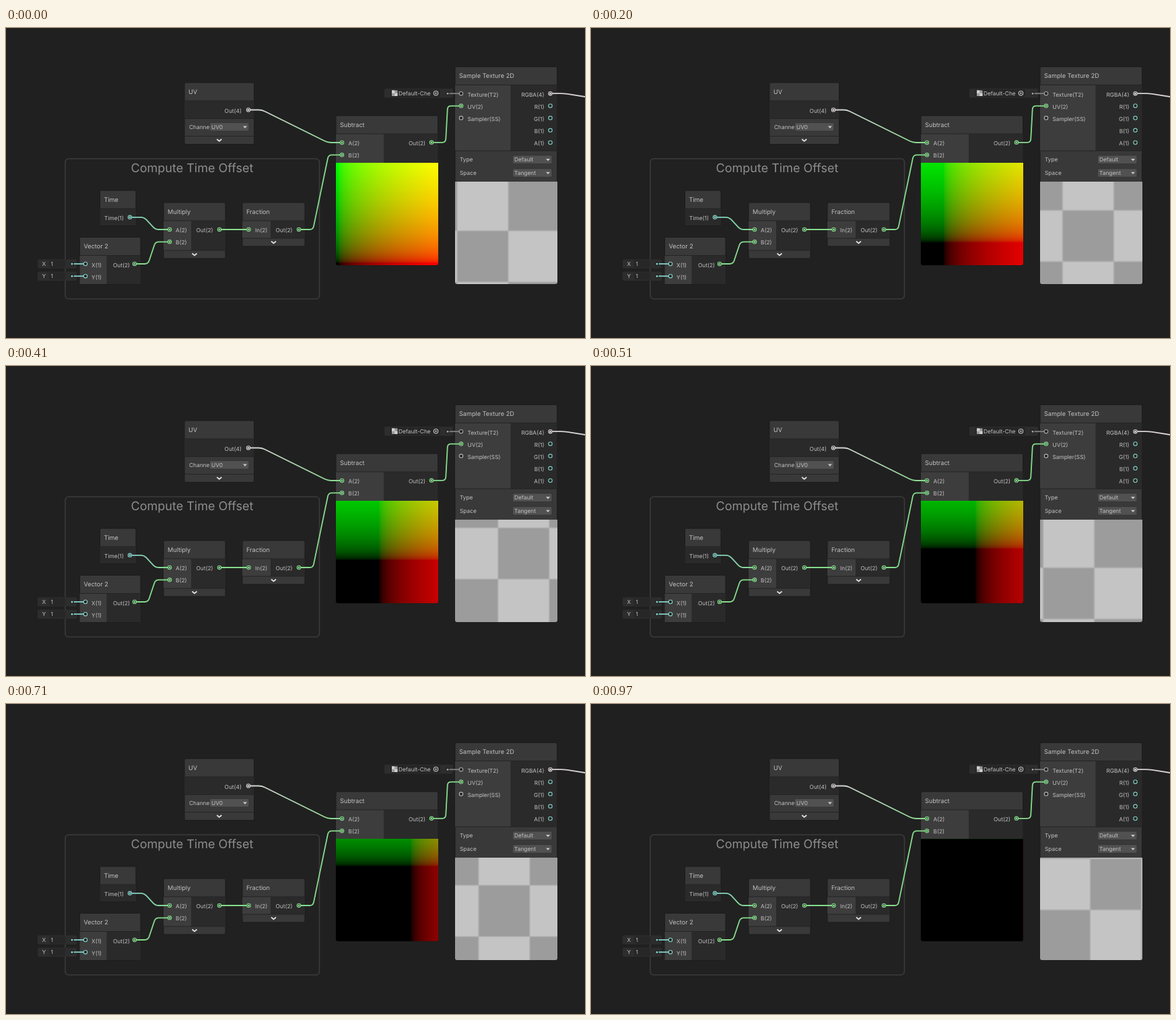
Animation, 860 px wide and 460 px high, one loop 1.02 s. Source, as an HTML page with a canvas:

```html
<!DOCTYPE html>
<html lang="en">
<head>
<meta charset="utf-8">
<title>Shader graph</title>
<style>
  html, body { margin: 0; width: 860px; height: 460px; overflow: hidden; background: #202020; }
  svg, canvas { position: absolute; display: block; }
  svg { left: 0; top: 0; }
  canvas { border-radius: 0 0 3px 3px; }
  #offset { left: 490px; top: 200px; }
  #sample { left: 667px; top: 228px; }
  text { font-family: Inter, Roboto, sans-serif; font-size: 8.3px; fill: #c2c2c2; text-rendering: geometricPrecision; }
  .title { font-size: 9.15px; }
  .group { font-size: 18px; fill: #8e8e8e; }
</style>
</head>
<body>
<svg id="graph" width="860" height="460"></svg>
<canvas id="offset" width="152" height="152"></canvas>
<canvas id="sample" width="152" height="152"></canvas>
<script>
const HEAD = '#393939', INPUT = '#3d3d3d', OUTPUT = '#2a2a2a', EDGE = '#1b1b1b';
const ONE = '#84d0c8', TWO = '#86db8c', FOUR = '#d8d2d6', TEX = '#a4a0a0';
const parts = [];
let gradients = 0;

const add = markup => parts.push(markup);
const rect = (x, y, w, h, fill, r = 0, extra = '') =>
  add(`<rect x="${x}" y="${y}" width="${w}" height="${h}" rx="${r}" fill="${fill}" ${extra}/>`);
const text = (s, x, y, cls = '', anchor = 'start') =>
  add(`<text x="${x}" y="${y}" class="${cls}" text-anchor="${anchor}">${s}</text>`);
const endText = (s, x, y) => text(s, x, y, '', 'end');
const circle = (x, y, r, fill, stroke = 'none') =>
  add(`<circle cx="${x}" cy="${y}" r="${r}" fill="${fill}" stroke="${stroke}" stroke-width="1.1"/>`);

function port(x, y, color, linked = true) {
  circle(x, y, 2.7, '#212121', color);
  if (linked) circle(x, y, 1.5, color);
}

function chevron(x, y) {
  add(`<path d="M${x - 3.5} ${y - 1.5}l3.5 3 3.5-3" fill="none" stroke="#e4e4e4" stroke-width="1.7"/>`);
}

function dropdown(label, x, y, w) {
  rect(x, y, w, 12.5, '#515151', 2, 'stroke="#303030" stroke-width=".7"');
  text(label, x + 2.5, y + 9.3);
  add(`<path d="M${x + w - 9} ${y + 5}h6l-3 3.4z" fill="#c8c8c8"/>`);
}

// Header, then a port area split at x = split
function node(title, x, y, w, h, split, portsH) {
  rect(x, y, w, h, HEAD, 2, `stroke="${EDGE}" stroke-width="1"`);
  text(title, x + 6, y + 16.7, 'title');
  rect(x, y + 27, split - x, portsH, INPUT);
  rect(split, y + 27, x + w - split, portsH, OUTPUT);
  rect(x, y + 26.5, w, 1, '#242424');
}

function strip(x, y, w) {
  rect(x, y - 0.5, w, 1, '#242424');
  chevron(x + w / 2, y + 6);
}

// Polyline with softened bends and a colour blend from left to right
function wire(pts, from, to = from) {
  const id = 'w' + gradients++;
  const [first, last] = [pts[0], pts[pts.length - 1]];
  let d = `M${first}`;
  for (let i = 1; i < pts.length - 1; i++) {
    const toward = ([x, y]) => {
      const dx = x - pts[i][0], dy = y - pts[i][1], k = 5 / Math.hypot(dx, dy);
      return [pts[i][0] + dx * k, pts[i][1] + dy * k];
    };
    d += `L${toward(pts[i - 1])}Q${pts[i]} ${toward(pts[i + 1])}`;
  }
  add(`<linearGradient id="${id}" gradientUnits="userSpaceOnUse" x1="${first[0]}" y1="0" x2="${last[0]}" y2="0">
    <stop stop-color="${from}"/><stop offset="1" stop-color="${to}"/></linearGradient>
    <path d="${d}L${last}" fill="none" stroke="url(#${id})" stroke-width="1.8"/>`);
}

// Group
rect(88, 194, 377.5, 208, '#212121', 5, 'stroke="#3b3b3b" stroke-width="1.6"');
text('Compute Time Offset', 276.5, 213.7, 'group', 'middle');

// Nodes
node('UV', 265, 81, 103.5, 91.5, 265, 26);
rect(265, 134, 103.5, 1, '#242424');
endText('Out(4)', 350, 125.5);
text('Channe', 272, 150);
dropdown('UV0', 302.5, 140.5, 58.5);
strip(265, 160.5, 103.5);

node('Time', 139.5, 241, 53.5, 52, 139.5, 25);
endText('Time(1)', 175, 285.2);

node('Vector 2', 109.5, 310.5, 90.5, 69.5, 149.5, 42.5);
text('X(1)', 127, 354.8);
text('Y(1)', 127, 373);
endText('Out(2)', 184, 354.8);

node('Multiply', 234, 259, 92, 83, 275, 44);
text('A(2)', 252, 303.2);
text('B(2)', 252, 321.4);
endText('Out(2)', 307.5, 303.2);
strip(234, 330, 92);

node('Fraction', 351, 259, 93, 65, 393, 26);
text('In(2)', 370, 303.2);
endText('Out(2)', 425.5, 303.2);
strip(351, 312, 93);

node('Subtract', 490, 130, 151.5, 222, 561, 44);
text('A(2)', 508.5, 174.2);
text('B(2)', 508.5, 192.2);
endText('Out(2)', 623, 174.2);

node('Sample Texture 2D', 667, 57.5, 151.5, 322, 749.5, 97.5);
['Texture(T2)', 'UV(2)', 'Sampler(SS)'].forEach((s, i) => text(s, 685.5, 101.8 + i * 18.1));
['RGBA(4)', 'R(1)', 'G(1)', 'B(1)', 'A(1)'].forEach((s, i) => endText(s, 799.5, 101.8 + i * 18.1));
rect(667, 181.7, 151.5, 1, '#242424');
text('Type', 674, 198.3);
text('Space', 674, 218);
dropdown('Default', 752.5, 189, 58.5);
dropdown('Tangent', 752.5, 208.7, 58.5);

// Inline inputs
[['X', 350], ['Y', 368.2]].forEach(([name, y]) => {
  rect(47, y - 6.7, 58, 13.4, '#2d2d2d', 2);
  rect(64, y - 5.5, 24, 11, '#272727', 2);
  text(name, 53.5, y + 3.1);
  text('1', 66.5, y + 3.1);
  wire([[98, y], [118, y]], ONE);
  circle(98, y, 2.7, '#212121');
  circle(98, y, 1.5, ONE);
  port(118, y, ONE, false);
});
rect(562, 90, 102, 13.4, '#2d2d2d', 2);
rect(571, 91, 74, 11.4, '#262626', 2);
rect(573, 92.5, 8.5, 8.5, '#9c9c9c');
rect(573, 92.5, 4.25, 4.25, '#d0d0d0');
rect(577.25, 96.75, 4.25, 4.25, '#d0d0d0');
text('Default-Che', 583, 100);
circle(638.5, 96.7, 3.2, 'none', '#c4c4c4');
circle(638.5, 96.7, 1.2, '#c4c4c4');
wire([[656, 97.2], [676, 97.2]], '#858080');
circle(656, 97.2, 2.7, '#212121');
circle(656, 97.2, 1.5, TEX);

// Wires
wire([[360, 121.5], [380, 121.5], [478, 170], [499, 170]], FOUR, TWO);
wire([[184, 280.8], [205, 280.8], [222, 299], [243, 299]], ONE, TWO);
wire([[191, 350], [211, 350], [222, 317.3], [243, 317.3]], TWO);
wire([[317, 299], [360.5, 299]], TWO);
wire([[435, 299], [456, 299], [479, 188.3], [499, 188.3]], TWO);
wire([[632, 169.8], [653, 169.8], [656, 115.6], [676, 115.6]], TWO);
wire([[808.5, 97.2], [829, 97.2], [862, 102.3]], FOUR);

// Ports
port(360, 121.5, FOUR);
port(184, 280.8, ONE);
[[191, 350], [243, 299], [243, 317.3], [317, 299], [360.5, 299], [435, 299],
 [499, 170], [499, 188.3], [632, 169.8], [676, 115.6]].forEach(p => port(...p, TWO));
port(676, 97.2, TEX, false);
port(676, 133.6, '#b4b4b4', false);
port(808.5, 97.2, FOUR);
[115.4, 133.6, 151.8, 170].forEach(y => port(808.5, y, ONE, false));

document.getElementById('graph').innerHTML = parts.join('');

// Previews
const SIZE = 152, LOOP = 1020;
const clamp = (v, lo, hi) => Math.min(hi, Math.max(lo, v));
const gamma = v => 255 * (v <= 0.0031308 ? 12.92 * Math.max(0, v) : 1.055 * v ** (1 / 2.4) - 0.055);
const wave = v => clamp(16 * Math.sin(2 * Math.PI * v), -1, 1);

function shader(id, shade) {
  const ctx = document.getElementById(id).getContext('2d');
  const image = ctx.createImageData(SIZE, SIZE);
  return t => {
    for (let y = 0, i = 0; y < SIZE; y++) {
      for (let x = 0; x < SIZE; x++, i += 4) {
        const u = (x + 0.5) / SIZE - t, v = 1 - (y + 0.5) / SIZE - t;
        image.data.set([...shade(u, v), 255], i);
      }
    }
    ctx.putImageData(image, 0, 0);
  };
}

const drawOffset = shader('offset', (u, v) => [gamma(u), gamma(v), 0]);
const drawSample = shader('sample', (u, v) => Array(3).fill(176 - 20 * wave(u) * wave(v)));

// The preview refreshes every 50 ms, with two slightly longer holds
const starts = Array.from({ length: 20 }, (_, k) => 50 * k + 10 * Math.floor((k + 1) / 10));
let shown = -1;

function tick() {
  const ms = performance.now() % LOOP;
  const start = starts.filter(s => s <= ms).pop();
  if (start !== shown) {
    shown = start;
    const t = 0.02 + start / 1000;
    drawOffset(t);
    drawSample(t);
  }
  requestAnimationFrame(tick);
}
tick();
</script>
</body>
</html>
```
